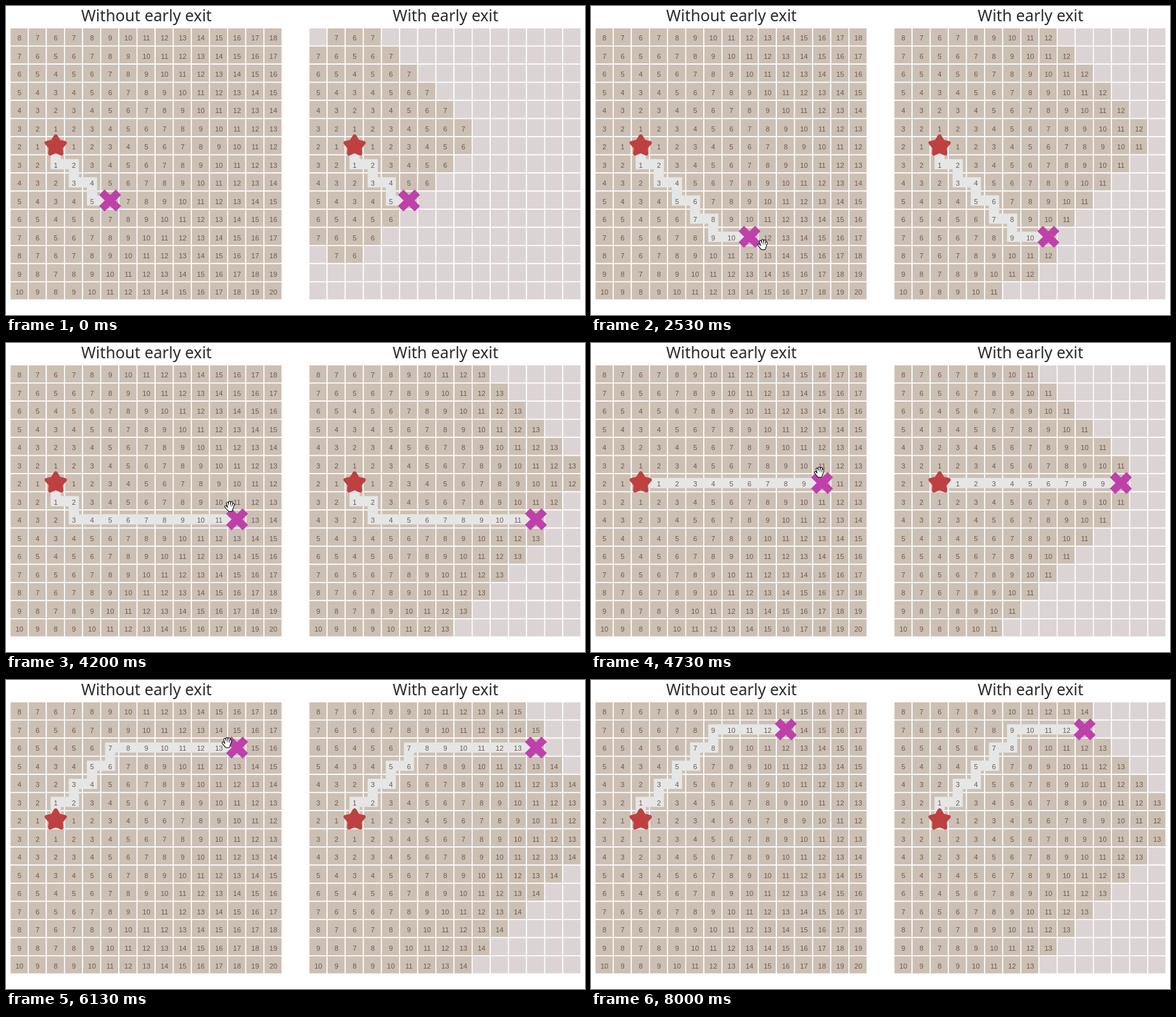
An HTML page for the animation above (8.07 s loop, 909 by 485 pixels).

```html
<!DOCTYPE html>
<html lang="en">
<head>
<meta charset="utf-8">
<title>Early exit</title>
<style>
html, body { margin: 0; width: 100%; height: 100%; overflow: hidden; background: #fff; }
svg { display: block; width: 909px; height: 485px; }
.title { font: 24.8px "Noto Sans", "Open Sans", sans-serif; fill: #2b2b2b; text-anchor: middle; }
.num { font: 11px "Liberation Sans", Arial, sans-serif; fill: #6a5855; text-anchor: middle; }
.cell { stroke: #fff; stroke-width: 1.6; }
.path { fill: none; stroke: #e6e6e6; stroke-width: 16; }
.star { fill: #bf4040; stroke: #bf4040; stroke-width: 6; stroke-linejoin: round; }
.goal { fill: none; stroke: #bf40aa; stroke-width: 12; }
.cursor path { stroke-linecap: round; stroke-linejoin: round; }
.edge { stroke: #000; stroke-width: 4; }
.face { fill: #fff; stroke: #fff; stroke-width: 2; }
</style>
</head>
<body>
<svg id="stage" viewBox="0 0 909 485"></svg>
<script>
const N = 15, SIZE = 427 / N, LEFT = 6.4, GAP = 469.2, TOP = 34.3;
const START = [2, 6], HOME = [5, 9];
const LOOP = 8070, STEP = 66.7, LAG = 130;
const REACHED = '#ccbfb3', UNSEEN = '#dcd4d4';
const DIRS = [[0, -1], [-1, 0], [0, 1], [1, 0]];
const REVERSED = [...DIRS].reverse();

// Key points of the drag: time, x, y
const DRAG = [
  [1140, 161, 308], [1530, 180, 309], [2530, 269, 374], [3730, 353, 306], [4200, 351, 256],
  [5200, 365, 160], [5530, 366, 148], [6130, 347, 98], [6800, 314, 75]
];
const ENTER = { from: 60, to: 870 }, LEAVE = { from: 7740, to: 7940 };
const GRAB = 925, GONE = 7990;

const HAND = 'M-3.5 -4.5L-1.5 2M0 -6V2M3.5 -5.5L2 2M6 -2.5L4 4M-6 1L-2 6M-2 2H4L3 7H-1Z';
const ARROW = 'M-5 -8V6L4 2Z';

const stage = document.getElementById('stage');

function add(parent, tag, attrs, text) {
  const el = document.createElementNS('http://www.w3.org/2000/svg', tag);
  for (const k in attrs) el.setAttribute(k, attrs[k]);
  if (text !== undefined) el.textContent = text;
  parent.appendChild(el);
  return el;
}

const place = (el, x, y) => el.setAttribute('transform', `translate(${x} ${y})`);
const mid = i => (i + 0.5) * SIZE;
const col = id => id % N;
const row = id => Math.floor(id / N);
const idOf = ([x, y]) => y * N + x;
const ids = [...Array(N * N).keys()];

function starPoints() {
  return Array.from({ length: 10 }, (_, i) => {
    const r = i % 2 ? 8.5 : 15.2, a = i * Math.PI / 5;
    return `${r * Math.sin(a)},${-r * Math.cos(a)}`;
  }).join(' ');
}

function makePanel(left, title, center) {
  add(stage, 'text', { class: 'title', x: center, y: 24 }, title);
  const grid = add(stage, 'g', { transform: `translate(${left} ${TOP})` });
  const cells = ids.map(id => add(grid, 'rect', {
    class: 'cell', x: col(id) * SIZE, y: row(id) * SIZE, width: SIZE, height: SIZE
  }));
  const marks = add(grid, 'g', { transform: 'translate(.5 .5)' });
  const path = add(marks, 'polyline', { class: 'path' });
  const nums = ids.map(id => add(marks, 'text', {
    class: 'num', x: mid(col(id)), y: mid(row(id)) + 5.42
  }));
  const star = add(marks, 'polygon', { class: 'star', points: starPoints() });
  place(star, mid(START[0]), mid(START[1]) - 0.3);
  const goal = add(marks, 'path', { class: 'goal', d: 'M-13 -13L13 13M-13 13L13 -13' });
  return { cells, nums, path, goal };
}

// Breadth-first search; neighbour order flips on alternate cells.
function search(goal, early) {
  const first = idOf(START);
  const cost = { [first]: 0 }, from = {}, queue = [first];
  for (const id of queue) {
    if (early && id === goal) break;
    for (const [dx, dy] of (col(id) + row(id)) % 2 ? REVERSED : DIRS) {
      const x = col(id) + dx, y = row(id) + dy, next = idOf([x, y]);
      if (x < 0 || y < 0 || x >= N || y >= N || next in cost) continue;
      cost[next] = cost[id] + 1;
      from[next] = id;
      queue.push(next);
    }
  }
  const route = [goal];
  while (route[0] !== first) route.unshift(from[route[0]]);
  return { cost, route };
}

function fillPanel(panel, goal, early) {
  const { cost, route } = search(goal, early);
  for (const id of ids) {
    panel.cells[id].setAttribute('fill', id in cost ? REACHED : UNSEEN);
    panel.nums[id].textContent = cost[id] || '';
  }
  panel.path.setAttribute('points', route.map(id => `${mid(col(id))},${mid(row(id))}`).join(' '));
  place(panel.goal, mid(col(goal)), mid(row(goal)));
}

const full = makePanel(LEFT, 'Without early exit', 220.5);
const early = makePanel(LEFT + GAP, 'With early exit', 690);
const cursor = add(stage, 'g', { class: 'cursor' });
const layers = ['edge', 'face'].map(name => add(cursor, 'path', { class: name }));

// Smooth curve through the drag points, at rest at both ends.
function dragAt(t) {
  const last = DRAG.length - 1;
  const time = Math.min(DRAG[last][0], Math.max(DRAG[0][0], t));
  const i = Math.min(last - 1, DRAG.findLastIndex(p => p[0] <= time));
  const a = DRAG[i], b = DRAG[i + 1], span = b[0] - a[0], u = (time - a[0]) / span;
  const slope = (j, k) => j === 0 || j === last ? 0 :
    (DRAG[j + 1][k] - DRAG[j - 1][k]) / (DRAG[j + 1][0] - DRAG[j - 1][0]) * span;
  const ease = u * u * (3 - 2 * u);
  return [1, 2].map(k => a[k] + (b[k] - a[k]) * ease +
    slope(i, k) * u * (1 - u) ** 2 - slope(i + 1, k) * u * u * (1 - u));
}

const progress = (t, { from, to }) => Math.min(1, Math.max(0, (t - from) / (to - from)));

function cursorAt(t) {
  const [x, y] = dragAt(t);
  const before = (1 - progress(t, ENTER)) ** 2, after = progress(t, LEAVE) ** 1.5;
  const arc = -90 * before * (1 - before) * 2;
  return [x + 720 * before + 444 * after, y + 19 * before + arc + 291 * after];
}

function goalAt(t) {
  if (t < DRAG[0][0]) return idOf(HOME);
  const [x, y] = dragAt(t - LAG);
  return idOf([Math.floor((x - LEFT) / SIZE), Math.floor((y - TOP) / SIZE)]);
}

let shown = -1;

function draw(time) {
  const t = Math.floor((time % LOOP + 10) / STEP) * STEP;
  const goal = goalAt(t);
  if (goal !== shown) {
    shown = goal;
    fillPanel(full, goal, false);
    fillPanel(early, goal, true);
  }
  const shape = t > GRAB && t < LEAVE.to - 140 ? HAND : ARROW;
  layers.forEach(el => el.setAttribute('d', shape));
  cursor.setAttribute('visibility', t > ENTER.from && t < GONE ? 'visible' : 'hidden');
  place(cursor, ...cursorAt(t));
}

const begin = performance.now();
function tick() {
  draw(performance.now() - begin);
  requestAnimationFrame(tick);
}
tick();
</script>
</body>
</html>
```
